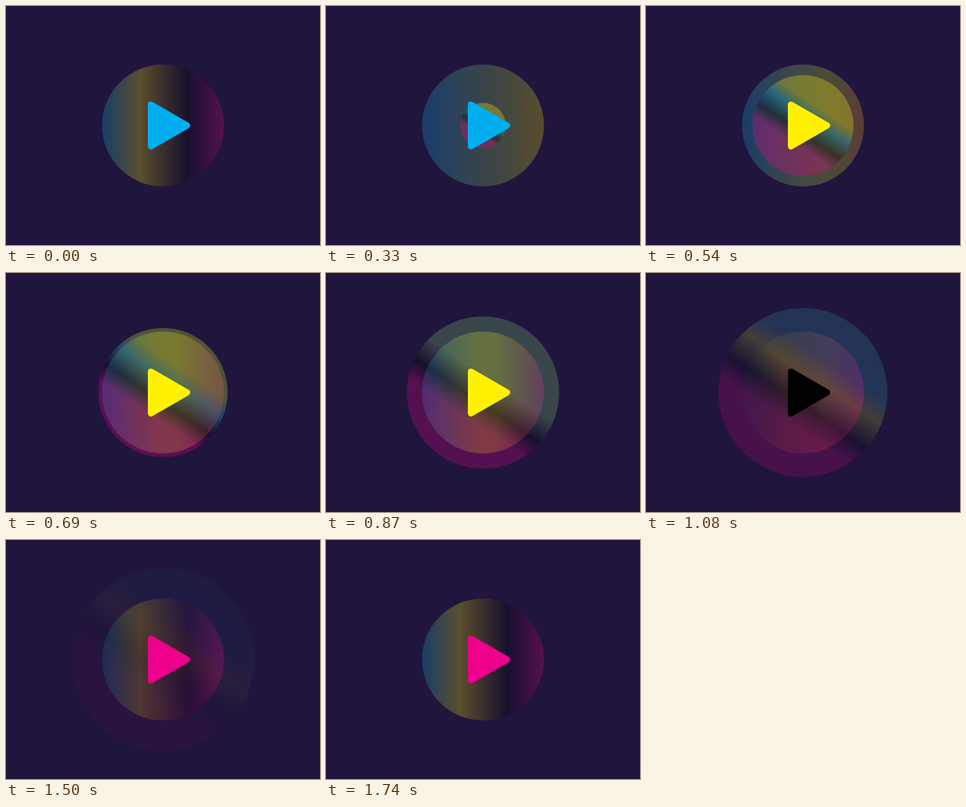
Write an HTML page with a canvas that moves like this. It is 394 px wide and 300 px high and loops after 1.77 s.

```html
<!DOCTYPE html>
<html lang="en">
<head>
<meta charset="utf-8">
<title>Play button pulse</title>
<style>
html, body { margin: 0; width: 100%; height: 100%; overflow: hidden; background: #20153c; }
canvas { display: block; }
</style>
</head>
<body>
<canvas id="stage" width="394" height="300"></canvas>
<script>
const ctx = document.getElementById('stage').getContext('2d');
const LOOP = 1770, STEP = 30, QUARTER = LOOP / 4;
const CX = 197, CY = 150, DISC = 76.5;
const C = [0, 174, 239], Y = [255, 242, 0], K = [0, 0, 0], M = [236, 0, 140];
const INKS = [C, Y, K, M];

const lerp = (a, b, t) => a + (b - a) * t;
const blend = (a, b, t) => a.map((v, i) => lerp(v, b[i], t));
const css = c => `rgb(${c.map(Math.round).join(',')})`;
const clamp = t => Math.min(1, Math.max(0, t));
const smooth = (a, b, t) => {
  const u = clamp((t - a) / (b - a));
  return u * u * (3 - 2 * u);
};

// Easing curve with control points (x1, 0) and (x2, 1)
function bezier(x1, x2, x) {
  x = clamp(x);
  let lo = 0, hi = 1;
  for (let i = 0; i < 30; i++) {
    const s = (lo + hi) / 2, q = 1 - s;
    if (3 * q * q * s * x1 + 3 * q * s * s * x2 + s * s * s < x) lo = s;
    else hi = s;
  }
  return lo * lo * (3 - 2 * lo);
}

const OFFSETS = [0, 0.31, 0.7, 1];
const ramp = (a, b) => ({ at: OFFSETS, ink: OFFSETS.map(o => blend(a, b, o)) });
const full = { at: OFFSETS, ink: INKS };

// Disc gradient at each quarter of the loop
const KEYS = [full, ramp(C, Y), { at: [0, 0.45, 0.6, 1], ink: [C, Y, Y, M] }, ramp(K, M), full];

function fillDisc(r, alpha, line, at, ink) {
  const g = ctx.createLinearGradient(...line);
  at.forEach((o, i) => g.addColorStop(o, css(ink[i])));
  ctx.globalAlpha = alpha;
  ctx.fillStyle = g;
  ctx.beginPath();
  ctx.arc(CX, CY, r, 0, Math.PI * 2);
  ctx.fill();
  ctx.globalAlpha = 1;
}

function drawBase(t) {
  const n = Math.floor(t / QUARTER), a = KEYS[n], b = KEYS[n + 1];
  const u = bezier(0.3, 0.2, t / QUARTER - n);
  fillDisc(DISC, 0.26, [CX - DISC, CY, CX + DISC, CY],
    a.at.map((o, i) => lerp(o, b.at[i], u)),
    a.ink.map((c, i) => blend(c, b.ink[i], u)));
}

function drawPulse(t) {
  const r = 115 * bezier(0.28, 0.2, t / 1640);
  if (r < 0.1) return;
  const swap = smooth(420, 1320, t);
  const alpha = 0.3 * (1 - smooth(600, LOOP, t));
  const dx = 0.56 * r, dy = -0.83 * r;
  fillDisc(r, alpha,
    [CX + dx * 0.47, CY + dy * 0.47, CX - dx * 0.39, CY - dy * 0.39],
    OFFSETS, [blend(Y, C, swap), blend(C, Y, swap), K, M]);
}

function drawArrow(t) {
  ctx.fillStyle = ctx.strokeStyle = css(INKS[Math.floor(t / QUARTER)]);
  ctx.lineWidth = 8;
  ctx.lineJoin = 'round';
  ctx.beginPath();
  ctx.moveTo(182, 124);
  ctx.lineTo(227, 150);
  ctx.lineTo(182, 176);
  ctx.closePath();
  ctx.fill();
  ctx.stroke();
}

const start = performance.now();
function draw() {
  const elapsed = Math.max(0, performance.now() - start) % LOOP;
  const t = Math.floor(elapsed / STEP) * STEP;
  ctx.fillStyle = '#20153c';
  ctx.fillRect(0, 0, 394, 300);
  drawBase(t);
  drawPulse(t);
  drawArrow(t);
  requestAnimationFrame(draw);
}
draw();
</script>
</body>
</html>
```
